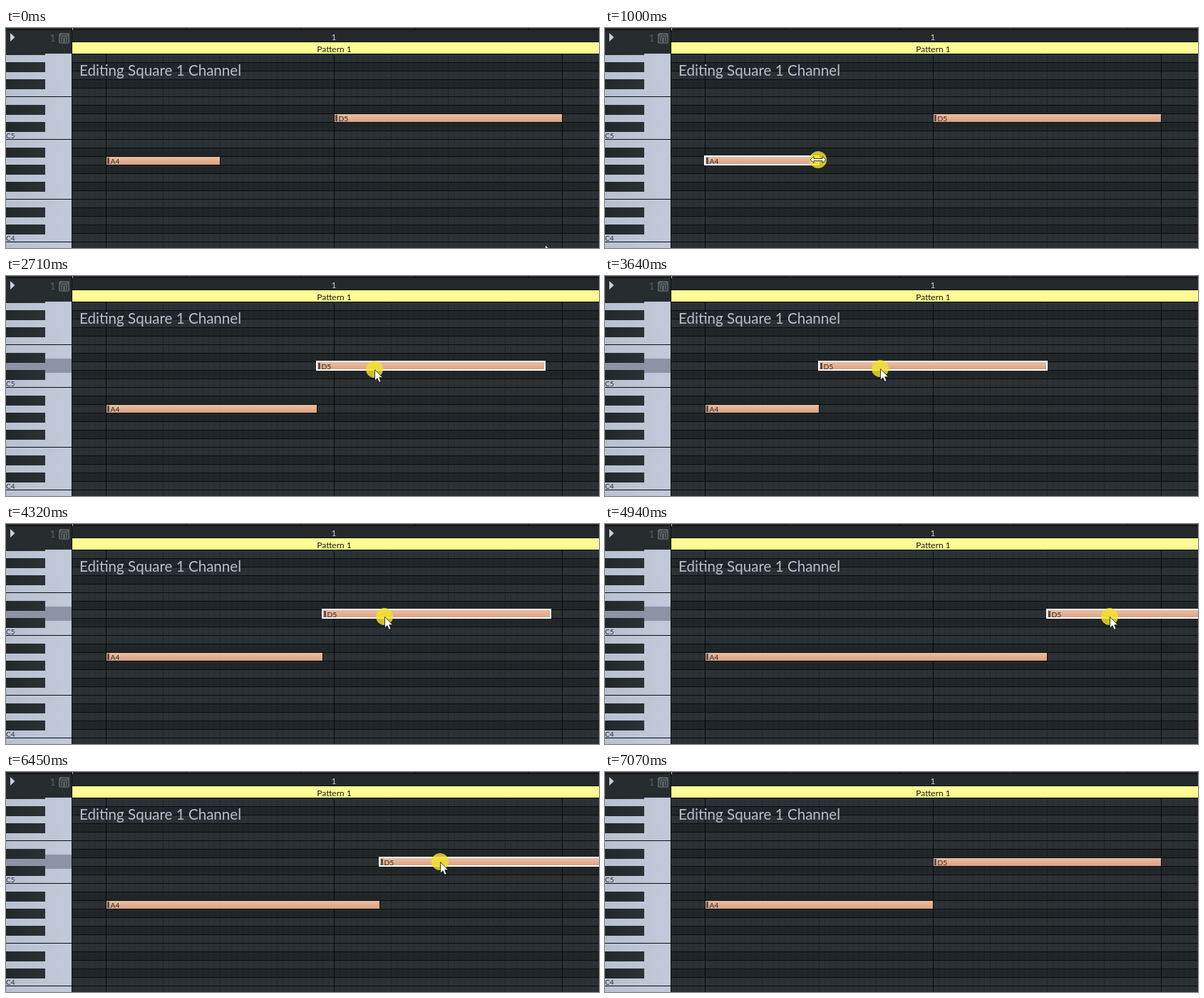
An HTML page that plays this animation: 832 px wide and 309 px high, repeating every 7530 ms.

```html
<!DOCTYPE html>
<html lang="en">
<head>
<meta charset="utf-8">
<title>Piano roll</title>
<style>
  html, body { margin: 0; width: 100%; height: 100%; overflow: hidden; background: #212629; }
  svg { display: block; width: 832px; height: 309px; }
  text { font-family: Lato, "Open Sans", sans-serif; }
</style>
</head>
<body>
<svg viewBox="0 0 832 309">
  <defs>
    <linearGradient id="peach" x2="0" y2="1">
      <stop stop-color="#f0bd9d"/><stop offset="1" stop-color="#d6a286"/>
    </linearGradient>
    <linearGradient id="ivory">
      <stop stop-color="#b9c1d1"/><stop offset="1" stop-color="#c2c9d8"/>
    </linearGradient>
    <linearGradient id="ebony">
      <stop stop-color="#22272a"/><stop offset="1" stop-color="#2c3134"/>
    </linearGradient>
  </defs>
  <g id="grid"></g>
  <g id="header"></g>
  <text x="103" y="67" font-size="20.6" fill="#b7bfd0">Editing Square 1 Channel</text>
  <g id="notes"></g>
  <g id="pointer">
    <circle id="click" r="12" fill="#f4e329" fill-opacity=".82"/>
    <path id="arrow" d="M.5 .5V16L4 12.7 6.4 18.3 9 17.2 6.7 11.7H11.5Z" fill="#fff" stroke="#111" stroke-width=".8"/>
    <path id="resize" d="M-11 0L-6 -4.5V-1.5H6V-4.5L11 0 6 4.5V1.5H-6V4.5Z" fill="#fff" stroke="#111" stroke-width=".8"/>
  </g>
</svg>
<script>
const LOOP = 7530, STEPS = 98;
const ROW = 12, LEFT = 93, TOP = 36, WIDTH = 832, HEIGHT = 309;
const INK = '#0b0d0e';
const ORIGIN = 140, UNIT = 8, BEAT = 80, BAR = 320;

const $ = id => document.getElementById(id);
const show = (el, on) => el.setAttribute('visibility', on ? 'visible' : 'hidden');
const rect = (x, y, w, h, fill, more = '') =>
  `<rect x="${x}" y="${y}" width="${w}" height="${h}" fill="${fill}" ${more}/>`;
const label = (x, y, size, fill, str, anchor = 'start') =>
  `<text x="${x}" y="${y}" font-size="${size}" fill="${fill}" text-anchor="${anchor}">${str}</text>`;

function columns() {
  let out = '';
  for (let x = ORIGIN - 5 * UNIT; x < WIDTH; x += UNIT) {
    const d = x - ORIGIN;
    const style = d % BAR === 0 ? 'stroke="#07090a"'
      : `stroke="${INK}" stroke-dasharray="2 2" stroke-opacity="${d % BEAT ? .3 : .6}"`;
    out += `<path d="M${x + .5} ${TOP}V${HEIGHT}" ${style}/>`;
  }
  return out;
}

function buildGrid() {
  let rows = '', lines = '', keys = '', seams = '';
  // Semitones counted down from the A sharp partly behind the header.
  for (let y = TOP - ROW, pitch = 82; y < HEIGHT; y += ROW, pitch--) {
    const tone = pitch % 12;
    const black = [1, 3, 6, 8, 10].includes(tone);
    rows += rect(LEFT, y, WIDTH - LEFT, ROW, black ? '#212629' : '#2b3134');
    lines += rect(LEFT, y, WIDTH - LEFT, 1, INK);
    if (black) keys += rect(0, y, 55, 14, 'url(#ebony)');
    if (tone === 0 || tone === 5) seams += rect(0, y + ROW, 92, 1, INK);
    if (tone === 0) seams += label(0, y + 11, 10, '#2b3033', 'C' + (pitch / 12 - 1));
  }
  $('grid').innerHTML = rows + columns() + lines +
    rect(0, TOP, 92, HEIGHT, 'url(#ivory)') +
    rect(0, 116, 92, 20, '#8d93a2', 'id="key"') +
    keys + seams + rect(92, TOP, 1, HEIGHT, INK);
}

function buildHeader() {
  let ticks = '';
  for (let x = 253; x < WIDTH; x += 2 * BEAT) ticks += rect(x, 0, 1, 3, INK);
  $('header').innerHTML =
    rect(0, 0, WIDTH, TOP, '#23282b') +
    rect(0, 0, 92, TOP, '#272c2f') +
    rect(0, 2, WIDTH, 1, INK) + ticks +
    rect(LEFT, 0, 1, 3, '#e5a184') +
    rect(92, 0, 1, TOP, INK) +
    rect(LEFT, 19, WIDTH - LEFT, 1, INK) +
    rect(LEFT, 20, WIDTH - LEFT, 16, '#fdfb94') +
    '<path d="M6 7L12.5 13 6 19Z" fill="#c9d0e1"/>' +
    label(62, 18.5, 12.5, '#5c6167', '1') +
    label(460, 16.5, 12, '#c3cada', '1', 'middle') +
    label(460.5, 33.7, 12, '#191c1e', 'Pattern 1', 'middle') +
    '<rect x="74" y="7" width="15" height="15" rx="2.5" fill="#5a5f64"/>' +
    '<path d="M76.5 20V14A5 5 0 0 1 86.5 14V20H83.5V14A2 2 0 0 0 79.5 14V20Z" fill="none" stroke="#272c2f"/>';
}

function makeNote(name, y) {
  const g = document.createElementNS('http://www.w3.org/2000/svg', 'g');
  g.innerHTML = rect(.5, .5, 0, ROW, 'url(#peach)', `stroke="${INK}"`) +
    rect(2, 2, 3, 9, '#655a52') + rect(3, 2, 1, 9, '#4b4541') +
    label(6.5, 10.8, 10.3, '#2b2826', name) +
    rect(0, 0, 0, ROW, 'none', 'stroke="#fff" stroke-width="2"');
  $('notes').append(g);
  const body = g.firstElementChild, frame = g.lastElementChild;
  return (x, end, hover) => {
    g.setAttribute('transform', `translate(${x} ${y})`);
    body.setAttribute('width', end - x);
    frame.setAttribute('width', end - x);
    show(frame, hover);
  };
}

const home = { x: 756, y: 304 };
const moves = [
  { from: 0, to: 10, x: 299, y: 185, ease: 1.5 },
  { from: 14, to: 21, x: 666, y: 187, ease: 1.2 },
  { from: 23, to: 24, x: 659, y: 178, ease: 1 },
  { from: 24, to: 28, x: 540, y: 131, ease: 1.2 },
  { from: 34, to: 47, x: 386, y: 130, ease: 2 },
  { from: 50, to: 74, x: 880, y: 130, ease: 1.206 },
  { from: 77, to: 78, x: 785, y: 125, ease: 1 },
  { from: 78, to: 87, x: 545, y: 126, ease: 1.2 },
  { from: 90, to: 91, x: 562, y: 159, ease: 1 }
];

const clamp = (v, lo, hi) => Math.min(hi, Math.max(lo, v));
const within = (t, a, b) => t >= a && t < b;
const snap = (v, round) => ORIGIN + UNIT * round((v - ORIGIN) / UNIT);

function pointerAt(t) {
  let { x, y } = home;
  for (const m of moves) {
    const p = 1 - (1 - clamp((t - m.from) / (m.to - m.from), 0, 1)) ** m.ease;
    x += (m.x - x) * p;
    y += (m.y - y) * p;
  }
  return { x, y };
}

buildGrid();
buildHeader();
const lower = makeNote('A4', 180), upper = makeNote('D5', 120);

function render(time) {
  const t = Math.floor((time + 20) * STEPS / LOOP) % STEPS;
  const { x, y } = pointerAt(t);
  // The first drag sets the lower note's length, the second moves the upper note,
  // which trails the pointer a little and cuts the lower one off.
  const length = snap(pointerAt(clamp(t, 14, 21)).x + 1, Math.round);
  const start = snap(pointerAt(clamp(t - .1, 34, 90)).x - BEAT, Math.floor);
  const sizing = within(t, 9, 24), dragging = within(t, 32, 90);

  lower(ORIGIN, Math.min(length, start), sizing);
  upper(start, start + BAR, within(t, 27, 91));
  show($('key'), dragging);
  $('pointer').setAttribute('transform', `translate(${Math.round(x)} ${Math.round(y)})`);
  show($('click'), dragging || within(t, 13, 24));
  show($('resize'), sizing);
  show($('arrow'), !sizing && t < 92);
}

const began = performance.now();
function tick() {
  render((performance.now() - began) % LOOP);
  requestAnimationFrame(tick);
}
tick();
</script>
</body>
</html>
```
